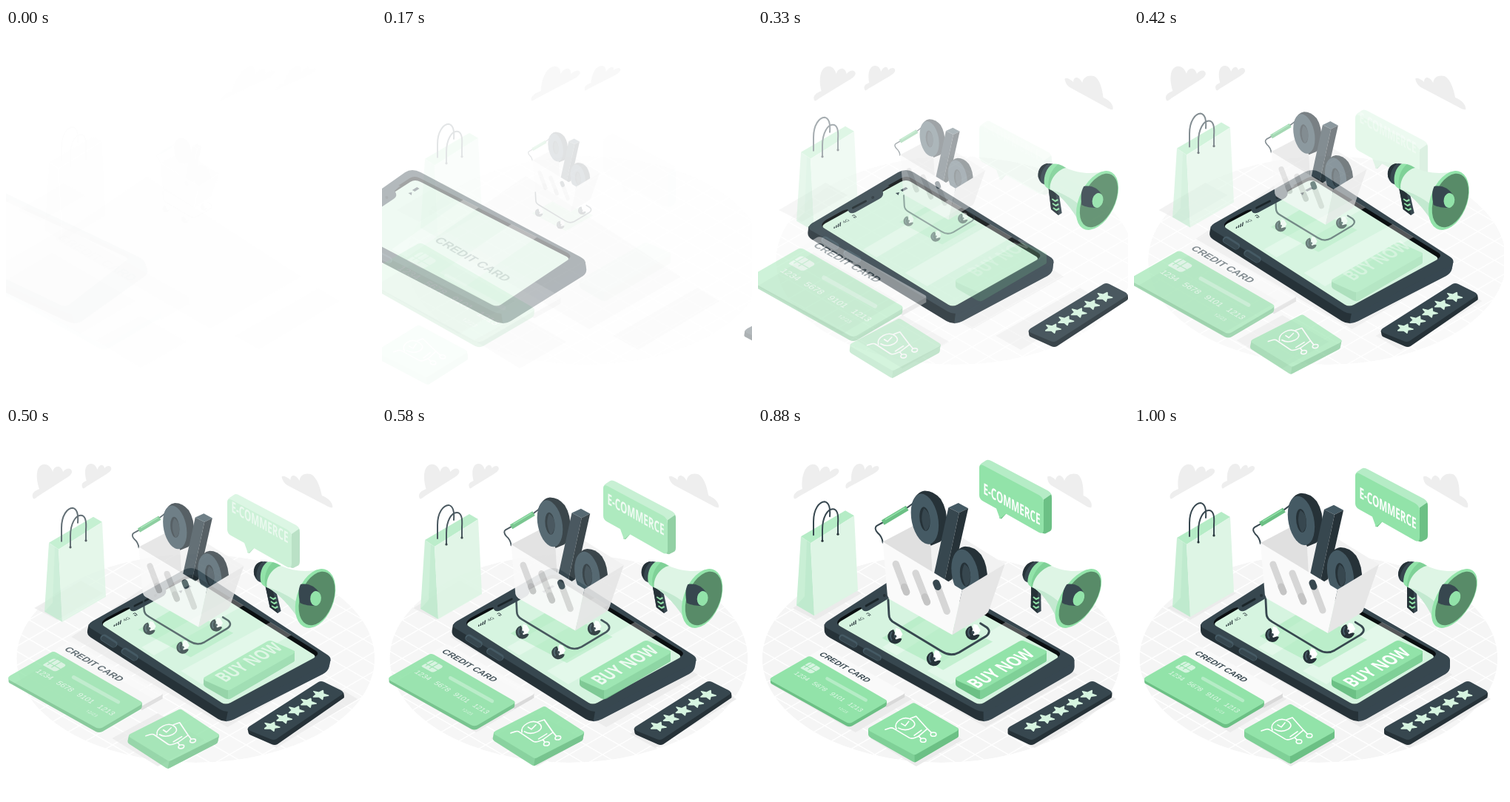
Animation, 500 px wide and 500 px high, one loop 1.04 s. Source, as an HTML page:

```html
<!DOCTYPE html>
<html lang="en">
<head>
<meta charset="utf-8">
<title>E-commerce</title>
<style>
html, body { margin: 0; width: 100%; height: 100%; overflow: hidden; background: #fff; }
svg { display: block; width: 100%; height: 100%; }
text { font-family: "Open Sans", "Noto Sans", sans-serif; font-weight: 700; }
.sans { font-family: "Liberation Sans", Arial, sans-serif; }
.thin { font-weight: 400; }
.d { fill: #263238; } .m { fill: #37474f; } .l { fill: #455a64; }
.g { fill: #92e3a9; } .gd { fill: #6cc085; } .gm { fill: #7fd097; } .gl { fill: #b5ecc6; } .p { fill: #d6f4e0; }
.wire { fill: none; stroke: #37474f; stroke-width: 2; stroke-linecap: round; stroke-linejoin: round; }
.ink { fill: none; stroke: #fff; stroke-width: 1.6; stroke-linecap: round; stroke-linejoin: round; }
</style>
</head>
<body>
<svg viewBox="0 0 500 500">
<defs>
  <clipPath id="disc"><ellipse cx="249.5" cy="314" rx="242" ry="141"/></clipPath>
  <g id="ring">
    <path class="d" d="M-17 -20Q-11 -36 0 -37Q12 -37 21 -26Q30 -12 29 9Q28 25 20 30L8 35Z"/>
    <ellipse class="l" transform="matrix(.866 .4 0 1 0 0)" rx="21" ry="32"/>
    <ellipse class="d" transform="matrix(.866 .4 0 1 0 0)" rx="8" ry="15.5"/>
    <path class="m" d="M-1 -14Q7 -9 7 3Q6 13 1 16Q-3 10 -4 0Q-4 -9 -1 -14Z"/>
  </g>
  <g id="wheel">
    <path class="d" d="M-2 -9A9.5 9.5 0 1 0 9 3L2 1Z"/>
    <path fill="#fff" d="M-1 -1L1 -11L6 -10L10 -3L7 2L1 4Z"/>
    <path fill="none" stroke="#455a64" stroke-width="2" d="M-4 -6Q-8 0 -4 5"/>
    <circle class="m" r="2"/>
  </g>
</defs>

<g id="floor" clip-path="url(#disc)">
  <ellipse cx="249.5" cy="314" rx="242" ry="141" fill="#f5f5f5"/>
  <path id="grid" fill="none" stroke="#fff" stroke-width="1.4"/>
</g>

<g id="shadows" fill="#ebebeb">
  <path d="M45 246L108 209L138 226L76 262Z"/>
  <path d="M16 349L92 303L206 369L130 414Z"/>
  <path d="M150 422L212 388L275 424L212 460Z"/>
  <path d="M338 416L452 351L482 369L372 435Z"/>
  <path d="M95 285L220 200L430 336L306 407Z"/>
</g>

<g id="clouds" fill="#eee">
  <path d="M49 98C47 92 52 88 60 85C58 70 62 54 72 52C79 51 82 56 83 62C86 54 96 51 97 62C102 56 110 56 109 62C108 65 104 68 100 70L56 95C52 98 50 99 49 98Z"/>
  <path d="M119 84C117 78 121 76 126 74C125 62 129 51 137 51C142 51 143 55 144 59C147 52 154 50 154 57C158 53 164 53 163 58C162 61 158 63 155 65L124 82C121 84 120 85 119 84Z"/>
  <path d="M391 70C390 66 398 68 402 73C403 66 410 64 414 74C416 66 424 63 431 65C439 69 440 85 440 94C447 97 453 103 451 110C449 111 445 109 442 107L396 80C393 78 391 73 391 70Z"/>
</g>

<g id="bag">
  <path class="gl" d="M58 151L118 116L130 123L71 160Z"/>
  <path class="wire" d="M75 149V131C75 114 83 104 90 104C96 105 98 111 97 124"/>
  <path fill="#c9efd5" d="M58 151L71 160L76 258L52 244Z"/>
  <path fill="#b9e8c8" d="M66 157L63 232L52 244L76 258L71 160Z" opacity=".55"/>
  <path fill="#def5e5" d="M71 160L130 123L135 224L76 258Z"/>
  <path class="wire" d="M87 157V142C87 125 94 114 101 114C107 114 109 121 108 134V148"/>
  <circle class="d" cx="87" cy="157" r="1.6"/><circle class="d" cx="108" cy="148" r="1.6"/>
</g>

<g id="phone">
  <path class="d" d="M90 268V276Q90 282 97 286L292 396Q303 402 314 396L421 335Q427 331 427 325V316Z"/>
  <path class="l" d="M303 385V399.500Q309 399 314 396L421 335Q427 331 427 325V316Z" opacity=".55"/>
  <path class="m" d="M97 262L202 195Q212 189 223 195L421 309Q433 316 421 323L314 383Q303 389 292 383L97 275Q84 269 97 262Z"/>
  <path fill="#0b0f11" d="M113 259L207 203Q214 199 221 203L405 304Q411 308 405 312L304 374Q298 377 292 374L112 271Q103 266 113 259Z"/>
  <path class="p" d="M112 264L207 208Q214 204 221 208L403 309Q407 312 403 314L304 374Q298 377 292 374L112 271Q106 268 112 264Z"/>
  <path fill="#fff" opacity=".3" d="M275 232L294 242.500L187 310L168 299ZM335 265L367 282.500L260 349L228 331Z"/>
  <path class="m" d="M132 247L140 245Q143 253 151 249L181 231Q188 227 184 220L193 213L180 213Z"/>
  <path d="M147 243L163 234" stroke="#1b2529" stroke-width="3" stroke-linecap="round"/>
  <circle class="d" cx="172" cy="229" r="2"/>
  <path d="M114 286L130 295M146 304L162 313" stroke="#455a64" stroke-width="9" stroke-linecap="round"/>
  <path d="M114 287L130 296M146 305L162 314" stroke="#37474f" stroke-width="6" stroke-linecap="round"/>
  <path d="M125 271V268.500M127.500 270V266.500M130 269V264.500M132.500 268V262.500" stroke="#263238" stroke-width="1.300"/>
  <text font-size="6" transform="matrix(.866 -.5 .866 .5 138 264)" class="d thin">4G</text>
  <path d="M147 254Q150 251 153 256M149 256Q151 254.500 151.500 257" fill="none" stroke="#263238" stroke-width=".9"/>
  <path class="m" d="M202 223L207 222L206 226ZM208 219L215 215L218 217L211 221Z"/>
</g>

<g id="button">
  <path class="gd" d="M267 342V349Q267 351 270 353L296 368Q300 370 304 368L388 319Q390 318 390 315V304Z"/>
  <path class="gm" d="M300 356V369.500L304 368L388 319Q390 318 390 315V304Z"/>
  <path class="g" d="M269 339L353 291Q357 289 361 291L388 303Q392 305 388 308L304 356Q300 358 296 356L269 344Q265 341 269 339Z"/>
</g>
<g id="buy"><text font-size="25.500" fill="#fff" transform="matrix(.64 -.37 .866 .5 296 353.500)">BUY NOW</text></g>

<g id="tileUp"><g id="tile">
  <path class="gm" d="M149 411V419Q149 421 152 423L208 455Q211 457 214 455L269 423Q271 422 271 420V411Z"/>
  <path class="gd" d="M211 445V456.500L214 455L269 423Q271 422 271 420V411Z"/>
  <path class="g" d="M151 409L208 377Q211 375 214 377L269 409Q273 411 269 414L214 445Q211 447 208 445L151 414Q147 411 151 409Z"/>
  <g class="ink">
    <path d="M172 412L178 410Q181 409 184 411L204 423Q207 425 212 423L217 421"/>
    <path d="M187 411Q184 404 192 399Q200 394 208 399Q216 405 208 410Q199 415 190 410"/>
    <path d="M194 404L199 407L204 401M206 397L214 394L229 411L217 421M221 413L211 420"/>
    <ellipse cx="237" cy="418.500" rx="3.800" ry="2.600"/><ellipse cx="223" cy="426.500" rx="3.800" ry="2.600"/>
    <path d="M229 411L234 416M217 421L220 424"/>
  </g>
</g></g>

<g id="card">
  <path fill="#d9d9d9" d="M68 310L90 299L201 361V367L176 381Z"/>
  <path fill="#fafafa" d="M60 314L85 299Q88 297 92 299L199 359Q203 361 199 363L172 378Z"/>
  <text font-size="11.300" class="m sans" transform="matrix(.866 .5 -.866 .5 81 307.500)">CREDIT CARD</text>
  <path class="gd" d="M14 342V346Q14 348 17 349L120 407Q124 409 128 407L174 380Q176 379 176 376V372Z"/>
  <path class="g" d="M16 339L65 311Q68 309 72 311L174 370Q178 372 174 375L128 402Q124 404 120 402L16 345Q11 342 16 339Z"/>
  <path fill="#d6f4e0" d="M57 325L67 319Q69 318 72 319L82 325Q84 326 82 328L73 333Q70 334 68 333L57 327Q55 326 57 325Z"/>
  <path d="M61 322L77 331M66 329L78 322M61 326L73 319" stroke="#92e3a9" fill="none"/>
  <path d="M93 341L147 371" stroke="#b5ecc6" stroke-width="4.500" stroke-linecap="round"/>
  <g fill="#e3f8ea">
    <text font-size="9.500" word-spacing="5" class="sans thin" transform="matrix(.866 .5 -.866 .5 46 334)">1234 5678 9101 1213</text>
    <text font-size="5.500" class="thin" transform="matrix(.866 .5 -.866 .5 107 382)">12/23</text>
  </g>
</g>

<g id="bubble">
  <path class="gl" d="M299 69Q299 64 302 62L308 58Q311 56 316 59L392 99Q397 102 397 107L386 113Z"/>
  <path class="gd" d="M386 111L396 104Q397 106 397 109V148Q397 153 394 154L388 157Q386 157 384 156ZM326 136L329 137L339 126L334 122Z"/>
  <path class="g" d="M299 69Q299 62 305 65L380 105Q386 109 386 115V151Q386 159 379 155L335 130L327 137L322 123L304 113Q299 110 299 105Z"/>
</g>
<g id="label"><text font-size="20.500" fill="#fff" transform="matrix(.57 .317 0 1 304.500 97)">E-COMMERCE</text></g>

<g id="cart">
  <path fill="#92e3a9" opacity=".4" d="M170 284L231 248L315 289L250 326Z"/>
  <path class="wire" d="M210 108L202 114L172 132L163 137Q159 140 164 146Q170 151 171 159"/>
  <path d="M174 131L200 115.500" stroke="#6cc085" stroke-width="7" stroke-linecap="square"/>
  <path d="M174 129L200 113.500" stroke="#92e3a9" stroke-width="1.500"/>
  <path fill="#f2f2f2" d="M232 126L331 187L275 222L236 200Z"/>
  <path fill="#e0e0e0" d="M171 158L232 126L236 200Z"/>
  <use href="#ring" x="226" y="128"/>
  <path class="l" d="M257 113L270 107L283 114L271 120Z"/>
  <path class="m" d="M257 113L271 120L251 214L237 205Z"/>
  <path class="d" d="M271 120L283 114L262 207L251 214Z"/>
  <use href="#ring" x="279" y="201"/>
  <path fill="#fafafa" d="M171 158L275 221L262 280L181 234Q178 232 177 228Z"/>
  <path fill="#e6e6e6" d="M275 221L331 187L310 248Q309 251 306 253L262 280Z"/>
  <g stroke-width="9" stroke-linecap="round">
    <path d="M188 187L202 224M214 199L229 237M241 212L255 249" stroke="#d6d6d6"/>
    <path d="M199 217L202 224M226 230L229 237" stroke="#c4c4c4"/>
    <path d="M241 212L243 217" stroke="#37474f"/>
  </g>
  <path class="wire" style="stroke-width:2.800" d="M178 234L179 253Q179 260 186 264L249 302Q260 309 271 303L306 282Q314 276 307 270L299 265"/>
  <use href="#wheel" x="187" y="282"/><use href="#wheel" x="238" y="311"/><use href="#wheel" x="289" y="277"/>
</g>

<g id="horn">
  <path class="m" d="M369 215L382 219L383 250L378 253L369 245Z"/>
  <path class="d" d="M369 215L378 220L378 253L369 245Z"/>
  <path d="M372 231L376 234L380 232M372 237L376 240L380 238M372 243L376 246L380 244" fill="none" stroke="#92e3a9" stroke-width="2"/>
  <path class="m" d="M380 184C368 180 357 190 357 202C358 208 361 211 366 212Z"/>
  <path class="d" d="M360 208C358 200 365 188 373 183C364 183 357 191 357 201Z"/>
  <path class="g" d="M378 184Q385 182 396 189L375 220Q365 217 364 211C364 200 370 189 378 184Z"/>
  <path class="gd" d="M386 184Q391 185 396 189L375 220L369 216C369 204 376 191 386 184Z" opacity=".5"/>
  <path fill="#def5e5" d="M396 189C412 197 430 198 452 193L411 272C402 252 387 227 371 218C371 206 384 191 396 189Z"/>
  <path fill="#c3e9d0" d="M371 218C385 222 399 230 408 239L407 268C401 250 387 227 371 218Z"/>
  <ellipse class="g" cx="433" cy="233" rx="23" ry="45" transform="rotate(32.400 433 233)"/>
  <ellipse fill="#588b68" cx="435" cy="233" rx="20.500" ry="41" transform="rotate(32.400 435 233)"/>
  <path class="m" d="M417 214C428 212 437 217 440 226L431 243C424 243 416 242 411 239C411 229 412 221 417 214Z"/>
  <ellipse class="g" cx="433.500" cy="233" rx="7" ry="10.500" transform="rotate(25 433.500 233)"/>
</g>

<g id="rating">
  <path class="d" d="M338 409V415Q338 417 341 418L366 430Q370 432 374 430L476 368Q478 367 478 364V360Z"/>
  <path class="m" d="M341 406L447 346Q451 344 455 346L475 357Q480 360 475 363L374 423Q370 425 366 423L341 412Q336 409 341 406Z"/>
  <path id="stars" class="p" stroke="#d6f4e0" stroke-width="1.500" stroke-linejoin="round"/>
</g>
</svg>
<script>
const $ = id => document.getElementById(id);
const STEP = 1000 / 24, LOOP = 1040;

let d = '';
for (let k = -12; k <= 12; k++) {
  const y = 314 + k * 26;
  d += `M0 ${y - 144}L500 ${y + 144}M0 ${y + 144}L500 ${y - 144}`;
}
$('grid').setAttribute('d', d);

d = '';
for (let i = 0; i < 5; i++) {
  for (let j = 0; j < 10; j++) {
    const a = j * Math.PI / 5, r = j % 2 ? 4.2 : 9;
    const u = r * Math.sin(a), v = -r * Math.cos(a);
    d += `${j ? 'L' : 'M'}${371 + 18.7 * i + .866 * (u + v)} ${406 - 10.7 * i + .5 * (v - u)}`;
  }
  d += 'Z';
}
$('stars').setAttribute('d', d);

// cubic-bezier(.36, -.01, .5, 1.38)
function ease(x) {
  if (x <= 0) return 0;
  if (x >= 1) return 1;
  const cubic = (s, a, b) => 3 * (1 - s) * s * ((1 - s) * a + s * b) + s ** 3;
  let lo = 0, hi = 1;
  for (let i = 0; i < 30; i++) {
    const s = (lo + hi) / 2;
    if (cubic(s, .36, .5) < x) lo = s; else hi = s;
  }
  return cubic(lo, -.01, 1.38);
}

function pose(id, transform, alpha) {
  const el = $(id);
  el.setAttribute('transform', transform);
  el.setAttribute('opacity', Math.max(0, Math.min(1, alpha)));
}

// side: -1 enters from the left, 1 from the right; cy is the skew centre
function dash(id, p, side, cy) {
  let skew, x = 0, alpha = 1;
  if (p < .6) {
    const e = ease(p / .6);
    skew = 20 - 30 * e;
    x = 250 * side * (1 - e);
    alpha = e;
  } else if (p < .8) {
    skew = -10 + 12 * ease((p - .6) / .2);
  } else {
    skew = 2 - 2 * ease((p - .8) / .2);
  }
  const k = Math.tan(-side * skew * Math.PI / 180);
  pose(id, `matrix(1 0 ${k} 1 ${x - k * cy} 0)`, alpha);
}

function slide(id, e, x, y, alpha = e) {
  pose(id, `translate(${x * (1 - e)} ${y * (1 - e)})`, alpha);
}

// nested rises: each level eases from 30 towards its parent's own shift
function rise(id, e, depth) {
  let own = 0, y = 0;
  for (let i = 0; i < depth; i++) {
    own = 30 * (1 - e) + e * own;
    y += own;
  }
  pose(id, `translate(0 ${y})`, Math.max(0, e) ** depth);
}

function zoom(id, e, from, cx, cy) {
  const s = from + (1 - from) * e;
  pose(id, `translate(${cx} ${cy}) scale(${s}) translate(${-cx} ${-cy})`, e);
}

function draw(ms) {
  let n = 0;
  while (n < 24 && Math.round((n + 1) * STEP / 10) * 10 <= ms) n++;
  if (n < 2) n = 0;
  const p = (n + .9) / 25, e = ease(p);

  slide('floor', e, 30, 0);
  slide('shadows', e, -30, 0);
  slide('button', e, 0, 0, e * e);
  slide('buy', e, 0, -30, e * e);
  rise('bag', e, 1);
  rise('tileUp', e, 1);
  rise('label', e, 2);
  rise('bubble', e, 3);
  zoom('card', e, 1.5, 107, 354);
  zoom('cart', e, .5, 246, 206);
  dash('phone', p, -1, 295);
  dash('tile', p, -1, 416);
  dash('clouds', p, 1, 80);
  dash('horn', p, 1, 228);
  dash('rating', p, 1, 388);
}

const t0 = performance.now();
function tick() {
  draw((performance.now() - t0) % LOOP);
  requestAnimationFrame(tick);
}
tick();
</script>
</body>
</html>
```
